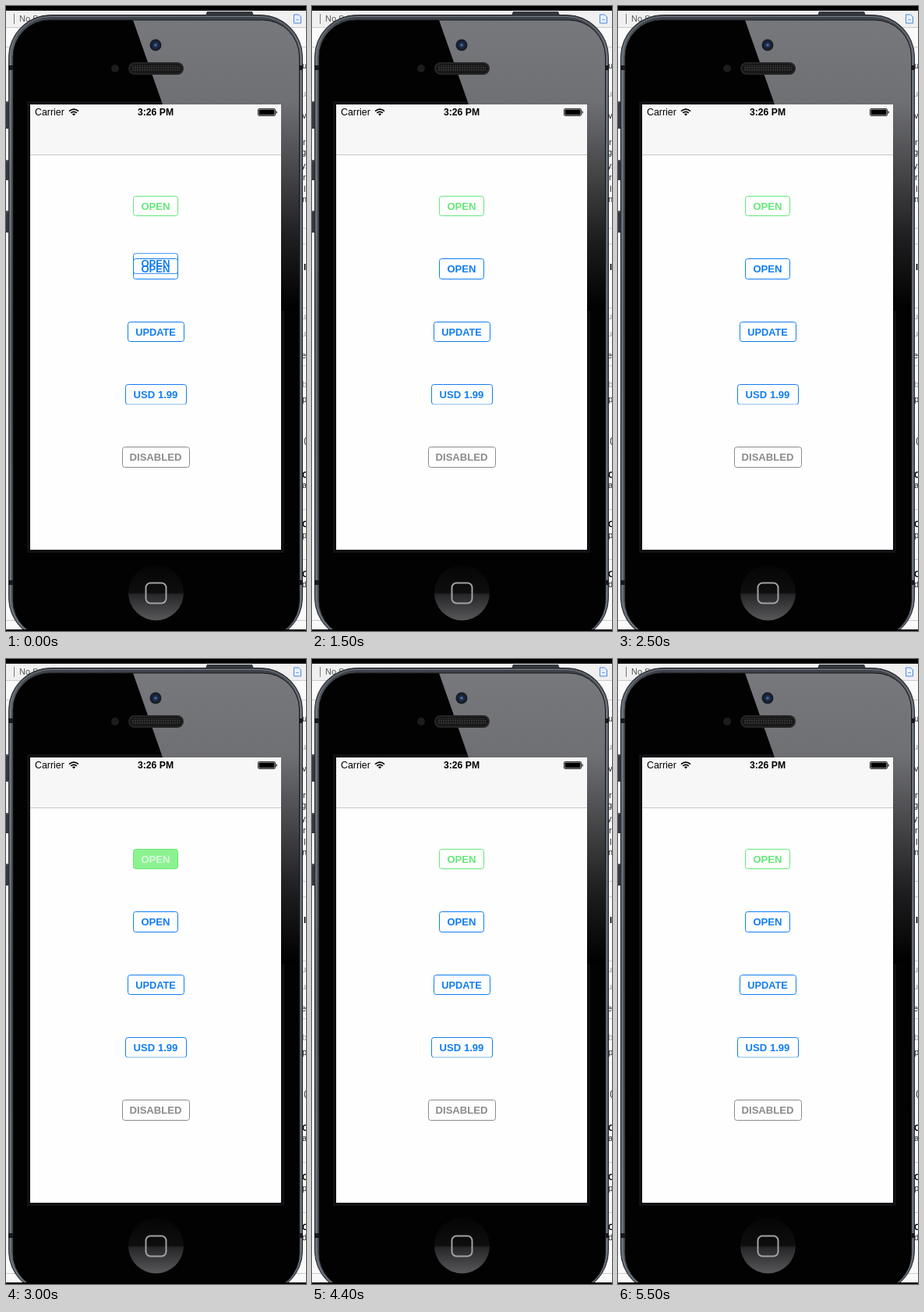
These frames come from a looping animation (385 px wide and 800 px high, 5.6 s). An HTML page:

```html
<!DOCTYPE html>
<html lang="en">
<head>
<meta charset="utf-8">
<title>Buttons</title>
<style>
html, body { margin: 0; width: 100%; height: 100%; overflow: hidden; background: #000; }
svg { display: block; width: 100vw; height: 100vh; }
text { font-family: "Liberation Sans", Arial, sans-serif; }
.btn { fill: none; stroke: currentColor; }
.label { fill: currentColor; font-size: 13.1px; font-weight: 700; text-anchor: middle; }
.green { color: #65e779; }
.blue { color: #117df3; }
.gray { color: #8b8b8b; }
.code text { font-size: 11px; fill: #222; }
.code .soft { fill: #999; }
.code .bold { font-weight: 700; fill: #000; }

.ghost { animation: settle 5.6s infinite; }
.tap { opacity: 0; animation: 5.6s infinite; }
.tap.green { animation-name: tapGreen; }
.tap.blue { animation-name: tapBlue; }
/* Steps of 100 ms */
@keyframes settle {
  0% { transform: translateY(-6.8px); opacity: 1; animation-timing-function: steps(7, end); }
  12.5% { transform: translateY(-.2px); opacity: 1; animation-timing-function: step-end; }
  19.643%, 100% { transform: none; opacity: 0; animation-timing-function: step-end; }
}
@keyframes tapGreen {
  0% { opacity: 0; animation-timing-function: step-end; }
  51.786% { opacity: .75; animation-timing-function: step-end; }
  55.357% { opacity: .75; animation-timing-function: steps(3, end); }
  60.714%, 100% { opacity: 0; }
}
@keyframes tapBlue {
  0% { opacity: 0; animation-timing-function: step-end; }
  87.5% { opacity: .64; animation-timing-function: step-end; }
  91.071% { opacity: .64; animation-timing-function: steps(2, end); }
  94.643%, 100% { opacity: 0; }
}
</style>
</head>
<body>
<svg viewBox="0 0 385 800" preserveAspectRatio="none">
  <defs>
    <linearGradient id="metal" x2="0" y2="1">
      <stop offset="0" stop-color="#3c4046"/>
      <stop offset=".06" stop-color="#5d636b"/>
      <stop offset=".5" stop-color="#4a4f57"/>
      <stop offset="1" stop-color="#5a6069"/>
    </linearGradient>
    <linearGradient id="glare" gradientUnits="userSpaceOnUse" x1="0" y1="18" x2="0" y2="390">
      <stop offset="0" stop-color="#77787c"/>
      <stop offset=".28" stop-color="#6f7074"/>
      <stop offset=".5" stop-color="#4a4a4d"/>
      <stop offset=".75" stop-color="#1e1e20"/>
      <stop offset="1" stop-color="#000"/>
    </linearGradient>
    <linearGradient id="home" x2="0" y2="1">
      <stop offset="0" stop-color="#050505"/>
      <stop offset=".5" stop-color="#0e0e0f"/>
      <stop offset=".53" stop-color="#262628"/>
      <stop offset="1" stop-color="#58585b"/>
    </linearGradient>
    <radialGradient id="lens">
      <stop offset="0" stop-color="#33517c"/>
      <stop offset=".45" stop-color="#1b2740"/>
      <stop offset="1" stop-color="#15181f"/>
    </radialGradient>
    <pattern id="mesh" width="3" height="3" patternUnits="userSpaceOnUse">
      <rect width="3" height="3" fill="#171717"/>
      <circle cx="1" cy="1" r=".8" fill="#555"/>
    </pattern>
    <clipPath id="face"><rect x="9" y="18" width="367.5" height="790" rx="47"/></clipPath>
  </defs>

  <!-- Window behind the phone -->
  <rect y="6" width="385" height="792" fill="#fafafa"/>
  <rect y="6" width="385" height="21" fill="#f0f0f0"/>
  <path d="M0 27.5H385M0 52.5H385M376 284.5H385M376 304.5H385M376 386.5H385M376 460.5H385M376 644.5H385M376 708.5H385M0 786.5H385" stroke="#ccc"/>
  <path d="M10.5 10V23" stroke="#777"/>
  <text x="17" y="20" font-size="11" fill="#555">No Sel</text>
  <path d="M369.5 11h6l3 3v8h-9z" fill="#e5efff" stroke="#5187d6"/>
  <path d="M372 17.5h4" stroke="#79a5e3"/>
  <g class="code">
    <text x="380" y="80">u</text>
    <text x="379" y="116" class="soft">ul</text>
    <text x="380" y="144">v</text>
    <text x="381" y="178">r</text>
    <text x="379" y="191">g</text>
    <text x="379" y="208">y/</text>
    <text x="381" y="223">r</text>
    <text x="382" y="238">l</text>
    <text x="380" y="251">n</text>
    <text x="382" y="338" class="bold">I</text>
    <text x="379" y="401" class="soft">ul</text>
    <text x="379" y="423" class="soft">ul</text>
    <text x="379" y="451">es</text>
    <text x="380" y="488" class="soft">b</text>
    <text x="380" y="507">p</text>
    <text x="382" y="560">(</text>
    <text x="380" y="604" class="bold">C</text>
    <text x="380" y="617">a</text>
    <text x="380" y="667" class="bold">C</text>
    <text x="380" y="681">p</text>
    <text x="380" y="731" class="bold">C</text>
    <text x="380" y="744">d</text>
  </g>

  <!-- Phone body -->
  <path d="M256 12l2-5h58l2 5z" fill="#35393f"/>
  <path d="M0 122h5v35H0zM0 197h5v26H0zM0 262h5v28H0z" fill="#34373d"/>
  <path d="M0 123h4M0 198h4M0 263h4" stroke="#777"/>
  <rect x="3.5" y="11.5" width="377" height="800" rx="54" fill="url(#metal)" stroke="#2a2d32"/>
  <rect x="5.5" y="13.5" width="373" height="796" rx="52" fill="none" stroke="#858c95" stroke-width=".8"/>
  <path d="M3 79h6M376 79h5M3 738h6M376 738h5" stroke="#17191c" stroke-width="6"/>
  <g clip-path="url(#face)">
    <rect y="18" width="385" height="790" fill="#020202"/>
    <rect x="28.5" y="123.5" width="327" height="575" fill="none" stroke="#101016" stroke-width="3"/>
    <path d="M163 18H385V390H353V126H201z" fill="url(#glare)"/>
  </g>
  <rect x="9" y="18" width="367.5" height="790" rx="47" fill="none" stroke="#17181b"/>
  <rect y="798" width="385" height="2" fill="#000"/>

  <circle cx="192" cy="50" r="7.5" fill="url(#lens)"/>
  <circle cx="192" cy="50" r="1.5" fill="#416fab"/>
  <circle cx="140" cy="80" r="5" fill="#1c1c1d"/>
  <rect x="157" y="72" width="71" height="16" rx="8" fill="#242425"/>
  <rect x="160" y="75" width="65" height="10" rx="5" fill="url(#mesh)" stroke="#0b0b0b"/>
  <circle cx="192.5" cy="751" r="35.5" fill="url(#home)"/>
  <rect x="179.5" y="738.5" width="26" height="26" rx="6" fill="none" stroke="#a2a2a2" stroke-width="2"/>

  <!-- Screen -->
  <rect x="31" y="126" width="322" height="570" fill="#fefefe"/>
  <rect x="31" y="126" width="322" height="64" fill="#f7f7f7"/>
  <path d="M31 190.5H353" stroke="#c6c6c6"/>
  <text x="37" y="140" font-size="12.4">Carrier</text>
  <text x="192" y="140" font-size="12.2" font-weight="700" text-anchor="middle">3:26 PM</text>
  <path d="M81 134.6q6-5 12 0M83.2 136.9q3.8-3.2 7.6 0" fill="none" stroke="#000" stroke-width="1.7"/>
  <path d="M84.9 138.2q2.1-1.6 4.2 0L87 140.5z"/>
  <rect x="323.5" y="131.5" width="22" height="9" rx="1.5" fill="none" stroke="#000" stroke-width=".8"/>
  <rect x="324.5" y="132.5" width="20" height="7" rx=".7"/>
  <path d="M346.5 134v4q1.3-.5 1.3-2t-1.3-2"/>

  <g class="green">
    <rect class="btn" x="163.5" y="243.5" width="57" height="25" rx="3"/>
    <text class="label" x="192" y="261">OPEN</text>
  </g>
  <g class="tap green">
    <rect x="163.5" y="243.5" width="57" height="25" rx="3" fill="#66ee6c"/>
    <text class="label" x="192" y="261" style="fill:#fff">OPEN</text>
  </g>

  <g id="open" class="blue">
    <rect class="btn" x="163.5" y="323.5" width="57" height="26" rx="3"/>
    <text class="label" x="192" y="341">OPEN</text>
  </g>
  <use href="#open" class="ghost"/>

  <g class="blue">
    <rect class="btn" x="156.5" y="404.5" width="72" height="25" rx="3"/>
    <text class="label" x="192" y="421.5" style="font-size:12.8px">UPDATE</text>
  </g>

  <g class="blue">
    <rect class="tap blue" x="153" y="485" width="78.5" height="25" rx="3" fill="#117df3"/>
    <rect class="btn" x="153.5" y="484.5" width="78" height="25.5" rx="3"/>
    <path d="M155 510.2H230" stroke="#fefefe" stroke-width="1.4" opacity=".65"/>
    <text class="label" x="192" y="502">USD 1.99</text>
  </g>

  <g class="gray">
    <rect class="btn" x="149.5" y="564.5" width="86" height="26" rx="3"/>
    <text class="label" x="192" y="582">DISABLED</text>
  </g>
</svg>
</body>
</html>
```
